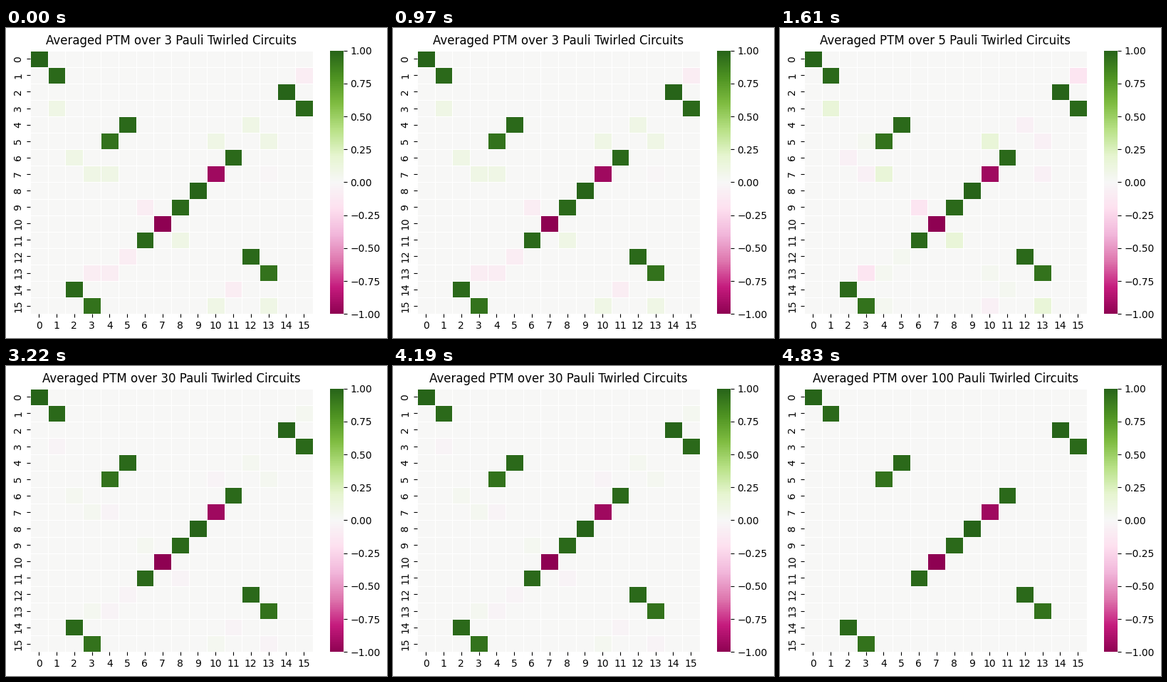
Write a matplotlib script that moves like this. It is 535x435 px and loops after 6440 ms.

```python
import numpy as np
import matplotlib.pyplot as plt
from matplotlib.animation import FuncAnimation

W, H, DPI = 535, 435, 100
SIZE = 16
COUNTS = [3, 5, 30, 100]

# Column and value of the dominant entry in each row.
MAIN_COLS = [0, 1, 14, 15, 5, 4, 11, 10, 9, 8, 7, 6, 12, 13, 2, 3]
MAIN_VALUES = [1, .97, 1, .97, .97, .93, .97, -.93,
               1, .97, -1, .97, .97, .93, .97, .93]

# Residual noise per average: (strength, {row: columns}); "~col" means negative.
NOISE = [
    [(.09, {1: [~15], 3: [1], 4: [12], 5: [10, 13], 6: [2], 7: [3, 4],
            9: [~6], 11: [8], 12: [~5], 13: [~3, ~4], 14: [~11],
            15: [10, 13]}),
     (.02, {7: [~13]})],
    [(.16, {1: [~15], 3: [1], 5: [10], 7: [4], 9: [~6], 11: [8],
            13: [~3], 15: [13]}),
     (.055, {4: [~12], 5: [~13], 6: [~2], 7: [~3, ~13], 15: [~10]}),
     (.035, {5: [3], 12: [5], 13: [4, 10], 14: [11], 15: [4]})],
    [(.036, {1: [15], 3: [~1], 4: [12], 5: [~10, 13], 6: [2], 7: [3, ~4],
             9: [6], 11: [~8], 12: [~5], 13: [3, ~4], 14: [~11],
             15: [10, ~13]})],
    [],
]


def transfer_matrix(step):
    matrix = np.zeros((SIZE, SIZE))
    for strength, entries in NOISE[step]:
        for row, cols in entries.items():
            for col in cols:
                if col < 0:
                    matrix[row, ~col] = -strength
                else:
                    matrix[row, col] = strength
    matrix[np.arange(SIZE), MAIN_COLS] = MAIN_VALUES
    return matrix


def add_axes(left, bottom, width, height):
    return fig.add_axes([left / W, bottom / H, width / W, height / H])


# The small margin keeps float rounding from dropping a pixel row.
fig = plt.figure(figsize=((W + .01) / DPI, (H + .01) / DPI), dpi=DPI,
                 facecolor="white")
ax = add_axes(33.722, 33.722, 396.8, 369.6)
cax = add_axes(455.322, 33.722, 18.48, 369.6)

mesh = ax.pcolormesh(transfer_matrix(0), cmap="PiYG", vmin=-1, vmax=1,
                     linewidths=.5, edgecolor="white")
ax.set(xlim=(0, SIZE), ylim=(SIZE, 0))
ax.spines[:].set_visible(False)
centers = np.arange(SIZE) + .5
ax.set_xticks(centers, range(SIZE))
ax.set_yticks(centers, range(SIZE), rotation="vertical", va="center")
title = ax.set_title("", y=1.0, pad=6)

colorbar = fig.colorbar(mesh, cax=cax)
colorbar.outline.set_linewidth(0)


def update(step):
    mesh.set_array(transfer_matrix(step))
    title.set_text(f"Averaged PTM over {COUNTS[step]} Pauli Twirled Circuits")
    return mesh, title


animation = FuncAnimation(fig, update, frames=len(COUNTS), interval=1610,
                          init_func=lambda: update(0), repeat=True,
                          repeat_delay=0, blit=False)
plt.show()
```
